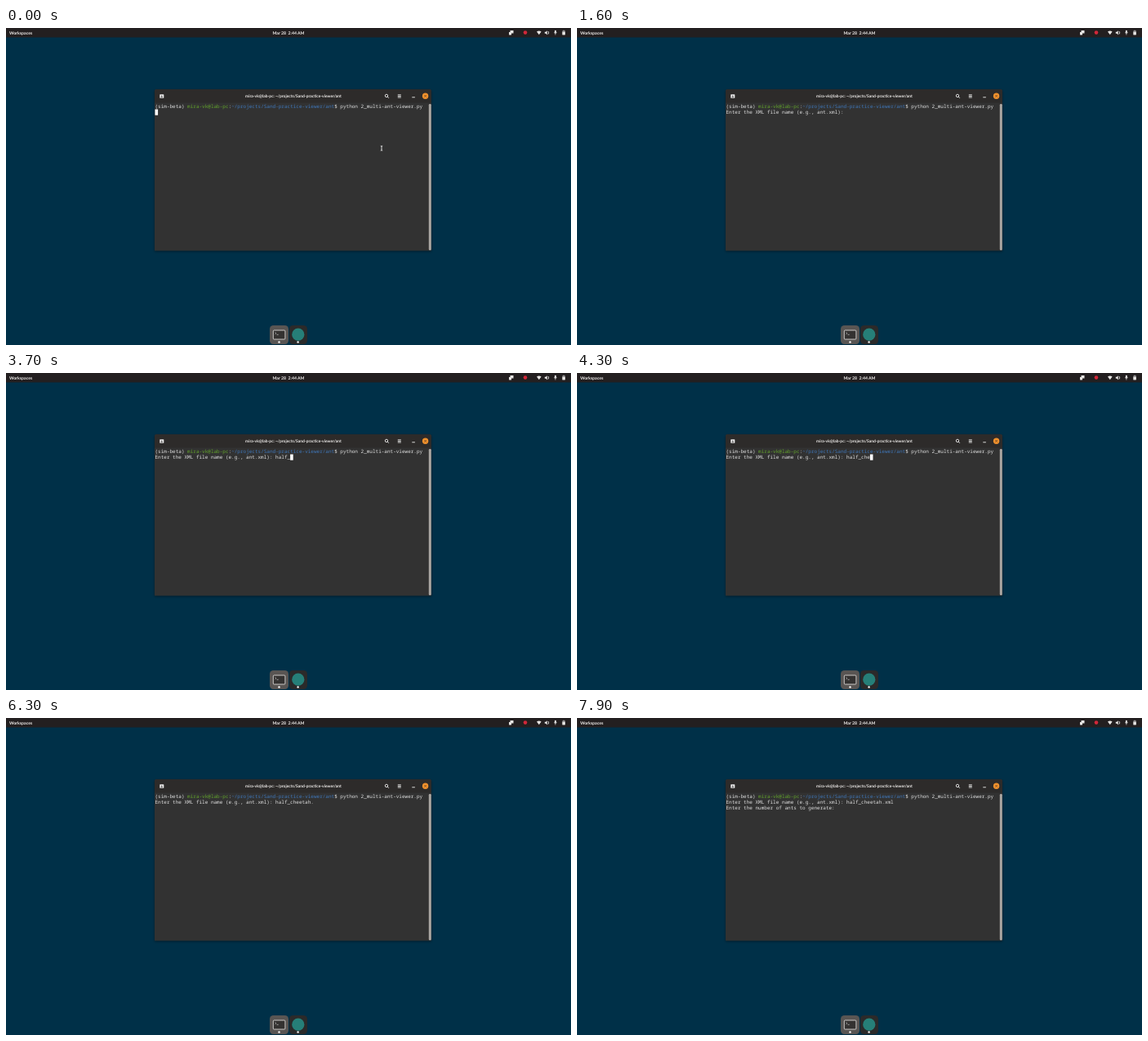
Animation, 692 px wide and 388 px high, one loop 8 s. Source, as an HTML page:

```html
<!DOCTYPE html>
<html lang="en">
<head>
<meta charset="utf-8">
<title>Terminal session</title>
<style>
  html, body { margin: 0; width: 100%; height: 100%; overflow: hidden; background: #003048; }
  svg { display: block; width: 100%; height: 100%; }
  text { white-space: pre; text-rendering: geometricPrecision; }
  .ui { font: 700 5.2px Lato, sans-serif; fill: #f0eeec; }
  .title { font-size: 4.95px; text-anchor: middle; }
  .term { font: 6px "Noto Sans Mono", monospace; fill: #dedede; }
  .line { fill: none; stroke: #eee; stroke-width: .9; }
</style>
</head>
<body>
<svg viewBox="0 0 692 388">
  <defs>
    <filter id="shadow" x="-10%" y="-10%" width="120%" height="120%">
      <feDropShadow dx="0" dy="1" stdDeviation="1.5" flood-opacity=".45"/>
    </filter>
  </defs>
  <rect width="692" height="388" fill="#003048"/>

  <!-- Top bar -->
  <rect width="692" height="11.5" fill="#231f20"/>
  <g class="ui">
    <text x="4" y="7.6">Workspaces</text>
    <text x="346" y="7.6" text-anchor="middle">Mar 28&#160;&#160;2:44 AM</text>
  </g>
  <g fill="#e8e6e4">
    <path d="M617.5 3h4v3.6h-4zM616 5h3v3.4h-3z"/>
    <circle cx="636" cy="5.6" r="2.3" fill="#d3283a"/>
    <path d="M650 4.4Q652.8 2.4 655.6 4.4L652.8 8.3z"/>
    <path d="M659.8 4.8h1.4l1.6-1.6v5.2l-1.6-1.6h-1.4z"/>
    <path class="line" d="M664 4q1.4 1.8 0 3.6" stroke-width=".6"/>
    <rect x="671.9" y="2.8" width="2" height="3.6" rx="1"/>
    <path class="line" d="M671 5.4q1.9 3 3.8 0M672.9 7v1.6" style="stroke-width:.6"/>
    <rect x="681.3" y="4.6" width="3.6" height="3.8" rx=".4"/>
    <path class="line" d="M682 4.8V3.3h2.2v1.5" style="stroke-width:.6"/>
  </g>

  <!-- Terminal window -->
  <g filter="url(#shadow)">
    <path d="M182 272.5V77.5q0-2.5 2.5-2.5h34 300q2.5 0 2.5 2.5v195z" fill="#333"/>
  </g>
  <path d="M182 91.5v-14q0-2.5 2.5-2.5h334q2.5 0 2.5 2.5v14z" fill="#2d2b2a"/>
  <rect x="517.8" y="93" width="3" height="179" rx="1.2" fill="#aaa6a2"/>
  <text class="ui title" x="352" y="85.1">mira-vk@lab-pc: ~/projects/Sand-practice-viewer/ant</text>
  <rect x="188.3" y="81.2" width="5" height="4.6" rx=".6" fill="#eee"/>
  <path d="M189.6 84.6h2.4M190.8 82.2v2.4" stroke="#2d2b2a" stroke-width=".7"/>
  <g class="line">
    <circle cx="466" cy="82.9" r="1.7"/>
    <path d="M467.2 84.1l1.7 1.7M479.8 81.8h4M479.8 83.4h4M479.8 85h4M497.3 84.8h3.6"/>
  </g>
  <circle cx="513.6" cy="83.3" r="3.7" fill="#f0912d"/>
  <path d="M512.3 82l2.6 2.6m0-2.6l-2.6 2.6" stroke="#5a3a20" stroke-width=".7"/>

  <g class="term">
    <text x="182.5" y="97.9">(sim-beta) <tspan fill="#62a32b">mira-vk@lab-pc</tspan>:<tspan fill="#3f76b8">~/projects/Sand-practice-viewer/ant</tspan>$ python 2_multi-ant-viewer.py</text>
    <text id="fileLine" x="182.5" y="105.1"></text>
    <text id="countLine" x="182.5" y="112.3"></text>
  </g>
  <rect id="cursor" width="3.6" height="7.2" fill="#fff"/>
  <path id="pointer" class="line" d="M458.8 144.3q1.2 0 1.2.8 0-.8 1.2-.8M460 145v4.4M458.8 150.1q1.2 0 1.2-.8 0 .8 1.2.8"/>

  <!-- Dock -->
  <rect x="323" y="364" width="23" height="23" rx="4.5" fill="#595553"/>
  <rect x="347" y="364" width="22" height="23" rx="4.5" fill="#2b2a2a"/>
  <rect x="327.3" y="370" width="14.6" height="11" rx="1" fill="#343231" stroke="#d8d6d4" stroke-width=".9"/>
  <path class="line" d="M329.6 372.6l1.3 1.1-1.3 1.1M331.6 375.3h2" style="stroke-width:.6"/>
  <circle cx="357.8" cy="375.2" r="7.6" fill="#267f78"/>
  <g fill="#fff">
    <circle cx="334.5" cy="384.4" r="1.2"/>
    <circle cx="357.6" cy="384.4" r="1.2"/>
  </g>
</svg>
<script>
const LOOP = 8000, LEFT = 182.5, TOP = 92.3, CELL = 3.6, ROW = 7.2;
const FILE_PROMPT = "Enter the XML file name (e.g., ant.xml): ";
const COUNT_PROMPT = "Enter the number of ants to generate: ";
const ANSWER = "half_cheetah.xml";
const PROMPT_AT = 1000, ENTER_AT = 7300;
const keyTimes = [2500, 2600, 2800, 3000, 3700, 3800, 4100, 4300,
                  4500, 4700, 4800, 5000, 5700, 6500, 6900, 7000];
const cursorHidden = [[200, 800], [1600, 2200], [5500, 5700], [6300, 6500], [7900, 8000]];

const [fileLine, countLine, cursor, pointer] =
  ["fileLine", "countLine", "cursor", "pointer"].map(id => document.getElementById(id));
const show = (el, on) => el.setAttribute("visibility", on ? "visible" : "hidden");

function draw(t) {
  const typed = ANSWER.slice(0, keyTimes.filter(k => k <= t).length);
  const first = t >= PROMPT_AT ? FILE_PROMPT + typed : "";
  const second = t >= ENTER_AT ? COUNT_PROMPT : "";
  fileLine.textContent = first;
  countLine.textContent = second;
  cursor.setAttribute("x", LEFT + CELL * (second || first).length);
  cursor.setAttribute("y", TOP + ROW * (second ? 2 : 1));
  show(cursor, !cursorHidden.some(([from, to]) => t >= from && t < to));
  show(pointer, t < PROMPT_AT);
}

const start = performance.now();
function frame() {
  draw((performance.now() - start) % LOOP);
  requestAnimationFrame(frame);
}
frame();
</script>
</body>
</html>
```
